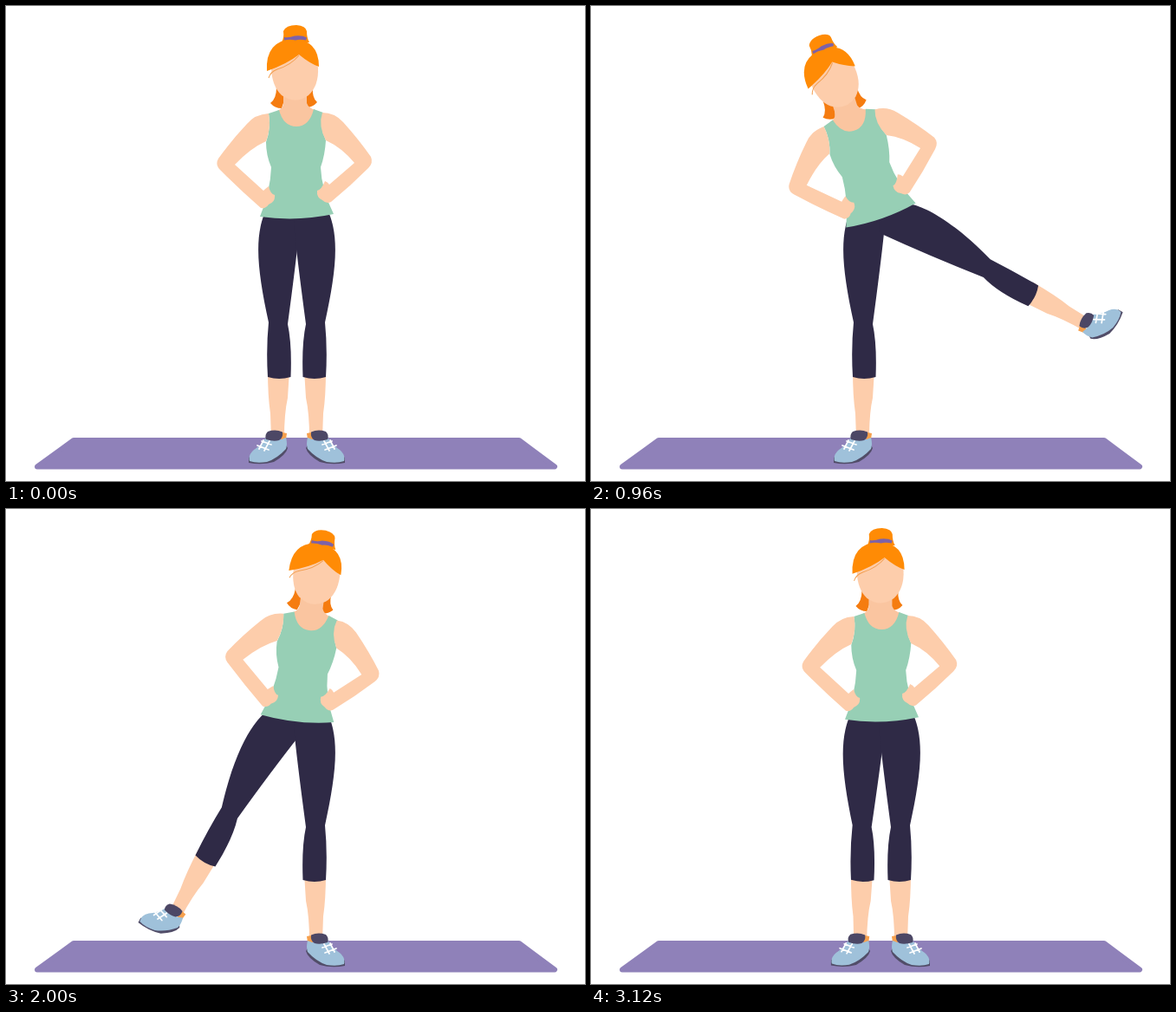
Animation, 668 px wide and 548 px high, one loop 3.2 s. Source, as an HTML page:

```html
<!DOCTYPE html>
<html lang="en">
<head>
<meta charset="utf-8">
<title>Side leg raises</title>
<style>
  html, body { margin: 0; width: 100%; height: 100%; overflow: hidden; background: #fff; }
  svg { display: block; width: 668px; height: 548px; }
  .skin { fill: #fdcdab; }
  .hair { fill: #ff8b05; }
  .tail { fill: #f57c10; }
  .pants { fill: #2f2a46; }
  .purple { fill: #7d62a8; }
</style>
</head>
<body>
<svg viewBox="0 0 668 548">
  <defs>
    <g id="shin">
      <path class="skin" d="M344 420H369Q369 450 366 470L365 498H350Q350 470 346 452Z"/>
      <path fill="#f6a04d" d="M347 493L352 492L354 500H348Z"/>
      <path fill="#514d68" d="M346 510Q348 518 362 526Q376 530 391 527L391 521L350 503Z"/>
      <path fill="#9fc1da" d="M348 498Q346 505 348 511Q358 522 370 526Q382 528 390 525Q392 518 385 512Q377 507 371 498Q360 504 348 498Z"/>
      <path fill="#4c4765" d="M352 491.500Q360 488 369 491Q373 495 371 500Q362 503 356 501Q351 498 352 491.500Z"/>
      <path fill="none" stroke="#fff" stroke-width="1.700" stroke-linecap="round" d="M365 506L376 502M368 512L381 507M367 502L373 513M374 501L379 511"/>
    </g>
  </defs>

  <path fill="#8f81b9" stroke="#8f81b9" stroke-width="6" stroke-linejoin="round" d="M78 501H592L633 531.500H36Z"/>

  <g class="leg" transform="translate(671) scale(-1 1)"><use href="#shin"/><path class="pants"/></g>
  <g class="leg"><use href="#shin"/><path class="pants"/></g>

  <g id="torso">
    <path class="head tail" d="M312 94Q312 107 305 112Q310 118 318 118L324 100ZM354 94Q353 106 359 111Q354 117 346 117L342 100Z"/>
    <path fill="#fac5a0" d="M320 96H347V112Q349 118 357 120L350 144H320L313 121Q320 118 320 112Z"/>
    <path fill="#97cfb5" d="M303 124L315 120Q320 139 335 139Q350 139 355 119L366 123Q361 138 369 155Q368 172 363 186Q364 212 378 240Q336 249 293 243Q305 214 306 186Q300 172 300 157Q306 140 303 124Z"/>
    <path class="skin" d="M303 124Q287 125 278 136Q260 155 245 176Q241 183 247 189Q270 212 294 233Q300 234 303 229Q311 226 310 218Q305 217 303 208Q299 211 297 213L264 183Q282 164 300 156Q306 140 303 124Z"/>
    <path class="skin" d="M365 123Q379 123 389 134Q407 154 421 174Q424 181 418 187Q397 208 375 226Q370 229 365 224Q358 221 359 213Q364 212 368 202Q371 203 373 206L402 181Q387 163 369 155Q360 138 365 123Z"/>
    <g class="head">
      <path class="skin" d="M306 72Q310 56 334 54Q357 56 360 71Q361 92 349 103Q334 114 318 103Q307 93 306 72Z"/>
      <path class="hair" d="M301 75Q299 40 331 38Q361 39 361 70Q350 66 338 56Q324 67 301 75Z"/>
      <path fill="none" stroke="#f3a053" d="M338 57Q329 68 313 73Q305 76 303 83"/>
      <path class="hair" d="M318 42Q321 37 320 29Q323 22 335 22Q346 23 347 29Q347 37 350 42Z"/>
      <path class="purple" d="M321 36Q326 37 333 34.500Q342 33.500 347 36.500L346 39.500Q339 38 334 39.500Q327 38 321 39.500Z"/>
    </g>
  </g>
</svg>
<script>
const HIP = [356, 260], CALF = [356, 428], WAIST = [335, 245], NECK = [334, 112];
const LOOP = 3200, STEP = 80, SWING = 1460, REACH = 83;
const LEAN = 0.27, NOD = 0.06, DROOP = 0.06;
const RIGHT_START = -3, LEFT_START = 1702;
const [left, right] = document.querySelectorAll('.leg');
const torso = document.getElementById('torso');
const headParts = document.querySelectorAll('.head');

function turn([x, y], deg, [cx, cy]) {
  const a = deg * Math.PI / 180, c = Math.cos(a), s = Math.sin(a);
  return [cx + (x - cx) * c - (y - cy) * s, cy + (x - cx) * s + (y - cy) * c];
}

function rotate(el, deg, pivot) {
  el.setAttribute('transform', `rotate(${deg} ${pivot})`);
}

// Leg angle: one smooth swing out and back
function swing(t, start) {
  const u = Math.min(1, Math.max(0, (t - start) / SWING));
  return REACH * (1 - Math.cos(2 * Math.PI * u)) / 2;
}

// The hip slides out a little, the thigh fills out and the foot hangs as the leg rises
function poseLeg(leg, angle) {
  const s = Math.sin(angle * Math.PI / 180), slide = 4 * s;
  const p = (x, y) => {
    const [px, py] = turn([x, y], -angle, HIP);
    return `${(px + slide).toFixed(2)} ${py.toFixed(2)}`;
  };
  const waist = turn([373, 240], -angle * LEAN, WAIST).join(' ');
  const [shin, pants] = leg.children;
  shin.setAttribute('transform',
    `translate(${slide}) rotate(${-angle} ${HIP}) rotate(${angle * DROOP} ${CALF})`);
  pants.setAttribute('d',
    `M332 236L${waist}C${p(385 + 9 * s, 270)} ${p(380 + 13 * s, 310)} ${p(368 + 4 * s, 365)}` +
    `Q${p(371, 395)} ${p(369, 428)}Q${p(356, 432)} ${p(342.5, 428)}` +
    `Q${p(341, 390)} ${p(346 + 4 * s, 367)}Q${p(337 + 8 * s, 300)} 333 262Z`);
}

function draw(now) {
  const t = Math.floor(now % LOOP / STEP) * STEP;
  const r = swing(t, RIGHT_START), l = swing(t, LEFT_START);
  poseLeg(right, r);
  poseLeg(left, l);
  rotate(torso, (l - r) * LEAN, WAIST);
  headParts.forEach(part => rotate(part, (l - r) * NOD, NECK));
}

let start;
function frame(now) {
  start ??= now;
  draw(now - start);
  requestAnimationFrame(frame);
}
draw(0);
requestAnimationFrame(frame);
</script>
</body>
</html>
```
